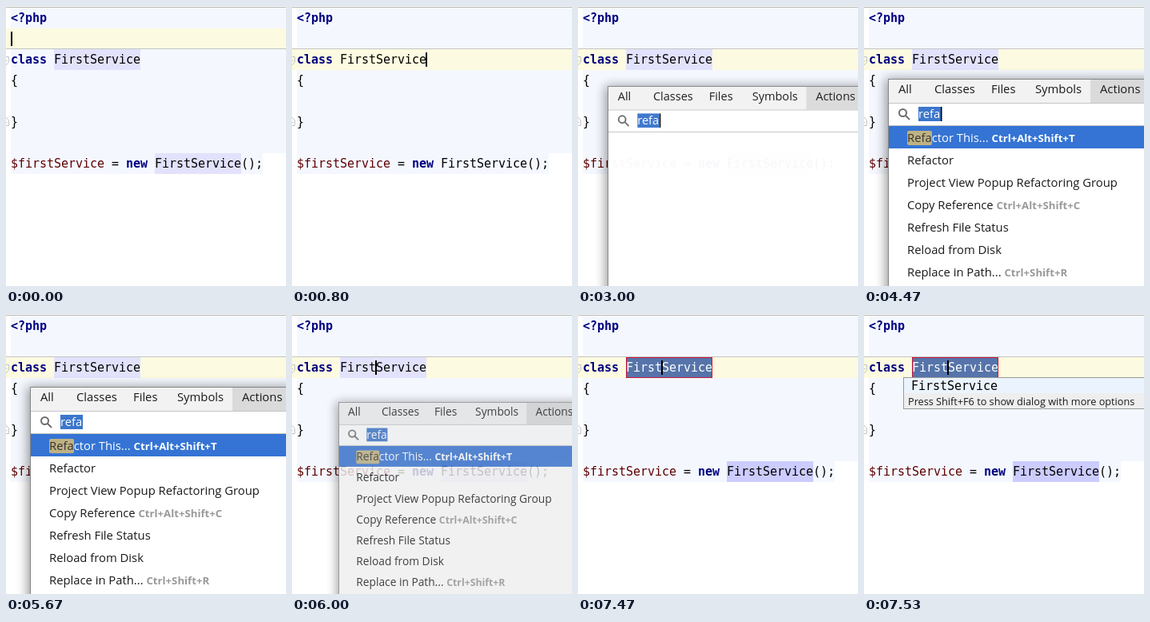
These frames come from a looping animation (350x350 px, 8000 ms). An HTML page:

```html
<!DOCTYPE html>
<html lang="en">
<head>
<meta charset="utf-8">
<title>Rename refactoring</title>
<style>
html, body { margin: 0; width: 100%; height: 100%; overflow: hidden; background: #fff; }
svg { display: block; width: 350px; height: 350px; }
text { white-space: pre; }
.code text { font: 15px "DejaVu Sans Mono", monospace; letter-spacing: -.03px; }
.code .kw { font-weight: bold; fill: #000080; }
.code .var { fill: #600000; }
.ui text { font: 14.8px "Open Sans", "Noto Sans", sans-serif; fill: #1a1a1a; }
.ui .key { font-size: 13.2px; font-weight: bold; fill: #999; }
.ui .sel, .ui .sel .key { fill: #fff; }
.ui .sep { font-weight: bold; fill: #808080; }
.ui .hint { font-size: 12.7px; }
.keys text { text-anchor: end; fill: #444; }
.mid { text-anchor: middle; }
.shadow { filter: blur(7px); opacity: .4; }
.line { stroke: #c4c4c4; fill: none; }

.row, .caret, .usage, .win, .list, .blink, .menu, .rename, .lookup {
  animation: 8s step-end infinite;
}
.row { animation-name: row; }
.caret { animation-name: caret; }
.usage { animation-name: usage; }
.win { animation-name: win; }
.list { animation-name: list; }
.blink { animation-name: blink; }
.menu { animation-name: menu; }
.rename { animation-name: rename; }
.lookup { animation-name: lookup; }

@keyframes row {
  0% { transform: translateY(28px); }
  10%, 100% { transform: translateY(54px); }
}
@keyframes caret {
  0% { transform: translate(6px, 32px); opacity: 1; }
  10% { transform: translate(167px, 58px); }
  18.3% { transform: translate(149px, 58px); }
  19.1% { transform: translate(140px, 58px); }
  21.6% { transform: translate(131px, 58px); }
  23.3% { transform: translate(122px, 58px); }
  27.5% { transform: translate(104px, 58px); opacity: 1; }
  36.6% { transform: translate(104px, 58px); opacity: 0; }
  74.1% { transform: translate(104px, 58px); opacity: 1; }
  77.4% { transform: translate(104px, 58px); opacity: 0; }
  93.3%, 100% { transform: translate(104px, 58px); opacity: 1; }
}
@keyframes usage {
  0% { opacity: 1; }
  2.5% { opacity: 0; }
  12.5%, 100% { opacity: 1; }
}
@keyframes win {
  0% { opacity: 0; transform: none; filter: none; }
  36.6% { opacity: .65; transform: translate(52px, 116px) scale(.945); filter: none; }
  37.45% { opacity: .97; transform: translate(37px, 100px) scale(.982); filter: none; }
  38.3% { opacity: 1; transform: translate(30px, 91px); filter: none; }
  74.1% { opacity: .94; transform: translate(42px, 99px) scale(.97); filter: brightness(.98); }
  74.95% { opacity: .82; transform: translate(58px, 110px) scale(.93); filter: brightness(.935); }
  75.8% { opacity: .4; transform: translate(82px, 127px) scale(.87); filter: brightness(.92); }
  77.4%, 100% { opacity: 0; transform: none; filter: none; }
}
@keyframes list {
  0% { opacity: 0; }
  38.3%, 100% { opacity: 1; }
}
@keyframes blink {
  0% { opacity: 1; }
  43.3% { opacity: 0; }
  55.8% { opacity: 1; }
  58.3% { opacity: 0; }
  64.1% { opacity: 1; }
  70.8%, 100% { opacity: 0; }
}
@keyframes menu {
  0% { opacity: 0; }
  77.4% { opacity: 1; }
  93.3%, 100% { opacity: 0; }
}
@keyframes rename {
  0% { opacity: 0; }
  93.3%, 100% { opacity: 1; }
}
@keyframes lookup {
  0% { opacity: 0; }
  94.1%, 100% { opacity: 1; }
}
</style>
</head>
<body>
<svg viewBox="0 0 350 350">
  <!-- editor -->
  <path fill="#f4f8fe" d="M6 2H350V184H321V210H6Z"/>
  <rect class="row" width="350" height="26" fill="#fcfae0"/>
  <path class="line" d="M0 1.5H350" style="stroke:#b4b4b4"/>
  <path class="line" d="M0 53.5H350"/>
  <path class="line" d="M0 63.5H3.5V70L0 74M0 139L3.5 143V149.5H0M0 68.5H1.5M0 145.5H1.5"/>
  <g class="usage" fill="#e2e2fd">
    <rect x="60" y="54" width="108" height="26"/>
    <rect x="186" y="184" width="108" height="26"/>
  </g>
  <g class="rename">
    <rect x="186" y="184" width="108" height="26" fill="#ccccff"/>
    <rect x="60.5" y="54.5" width="107" height="25" fill="#5674aa" stroke="#c8143c"/>
  </g>
  <g class="code">
    <text x="6" y="20" class="kw">&lt;?php</text>
    <text x="6" y="72"><tspan class="kw">class</tspan> FirstService</text>
    <text x="6" y="98">{</text>
    <text x="6" y="150">}</text>
    <text x="6" y="202"><tspan class="var">$firstService</tspan> = <tspan class="kw">new</tspan> FirstService();</text>
    <g class="rename">
      <rect x="61" y="55" width="106" height="24" fill="#5674aa"/>
      <text x="60" y="72" fill="#fff">FirstService</text>
    </g>
  </g>
  <rect class="caret" width="2" height="18"/>

  <!-- action search -->
  <g class="win ui"><g transform="translate(-30 -91)">
    <rect class="shadow" x="27" y="91" width="800" height="550"/>
    <rect x="30.5" y="91.5" width="800" height="542" fill="#fff" stroke="#858585"/>
    <rect x="31" y="92" width="799" height="29" fill="#f2f2f2"/>
    <rect x="283" y="92" width="78" height="29" fill="#dadada"/>
    <path class="line" d="M31 121.5H830M31 149.5H830"/>
    <text x="43" y="109">All</text>
    <text x="88" y="109">Classes</text>
    <text x="159" y="109">Files</text>
    <text x="214" y="109">Symbols</text>
    <text x="295" y="109">Actions</text>
    <g fill="none" stroke="#6e6e6e" stroke-width="2">
      <circle cx="48.5" cy="133.5" r="4.5"/>
      <path d="M52 137L57 142"/>
    </g>
    <rect x="68" y="126" width="28" height="18" fill="#3b75cc"/>
    <text x="68" y="140" class="sel">refa</text>
    <rect class="blink" x="96" y="126" width="1.5" height="18"/>
    <g class="list">
      <rect x="31" y="150" width="799" height="28" fill="#3574d4"/>
      <rect x="54" y="156" width="31" height="18" rx="2" fill="#bfb283"/>
      <text x="54" y="170" class="sel"><tspan fill="#333">Refa</tspan>ctor This... <tspan class="key">Ctrl+Alt+Shift+T</tspan></text>
      <text x="54" y="198">Refactor</text>
      <text x="54" y="226">Project View Popup Refactoring Group</text>
      <text x="54" y="254">Copy Reference <tspan class="key">Ctrl+Alt+Shift+C</tspan></text>
      <text x="54" y="282">Refresh File Status</text>
      <text x="54" y="310">Reload from Disk</text>
      <text x="54" y="338">Replace in Path... <tspan class="key">Ctrl+Shift+R</tspan></text>
    </g>
  </g></g>

  <!-- refactor menu -->
  <g class="menu ui">
    <rect class="shadow" x="103" y="82" width="205" height="290"/>
    <rect x="104.5" y="79.5" width="202" height="290" fill="#fff" stroke="#777"/>
    <rect x="105" y="80" width="201" height="23" fill="#e5e5e5"/>
    <rect x="105" y="103" width="201" height="22" fill="#3574d4"/>
    <path class="line" d="M105 128.5H306M110 186.5H175M236 186.5H302M105 328.5H306"/>
    <text x="206.5" y="96" class="mid">Refactor This</text>
    <text x="112" y="119" class="sel">1. Rename...</text>
    <text x="112" y="147">2. Move...</text>
    <text x="112" y="168">3. Copy...</text>
    <text x="205" y="191" class="mid sep">Extract</text>
    <text x="112" y="213">4. Variable...</text>
    <text x="112" y="234">5. Constant...</text>
    <text x="112" y="255">6. Field...</text>
    <text x="112" y="276">7. Parameter...</text>
    <text x="112" y="297">8. Method...</text>
    <text x="112" y="318">9. Interface...</text>
    <text x="112" y="346">0. Pull Members Up...</text>
    <g class="keys">
      <text x="297" y="119">Shift+F6</text>
      <text x="297" y="147">F6</text>
      <text x="297" y="168">F5</text>
      <text x="297" y="213">Ctrl+Alt+V</text>
      <text x="297" y="234">Ctrl+Alt+C</text>
      <text x="297" y="255">Ctrl+Alt+F</text>
      <text x="297" y="276">Ctrl+Alt+P</text>
      <text x="297" y="297">Ctrl+Alt+M</text>
    </g>
  </g>

  <!-- rename suggestion -->
  <g class="lookup">
    <rect x="49.5" y="79.5" width="310" height="39" fill="#ebf4fe" stroke="#999"/>
    <rect x="50" y="99" width="309" height="19" fill="#eeeeee"/>
    <g class="code"><text x="59" y="95">FirstService</text></g>
    <g class="ui"><text x="55" y="114" class="hint">Press Shift+F6 to show dialog with more options</text></g>
  </g>
</svg>
</body>
</html>
```
